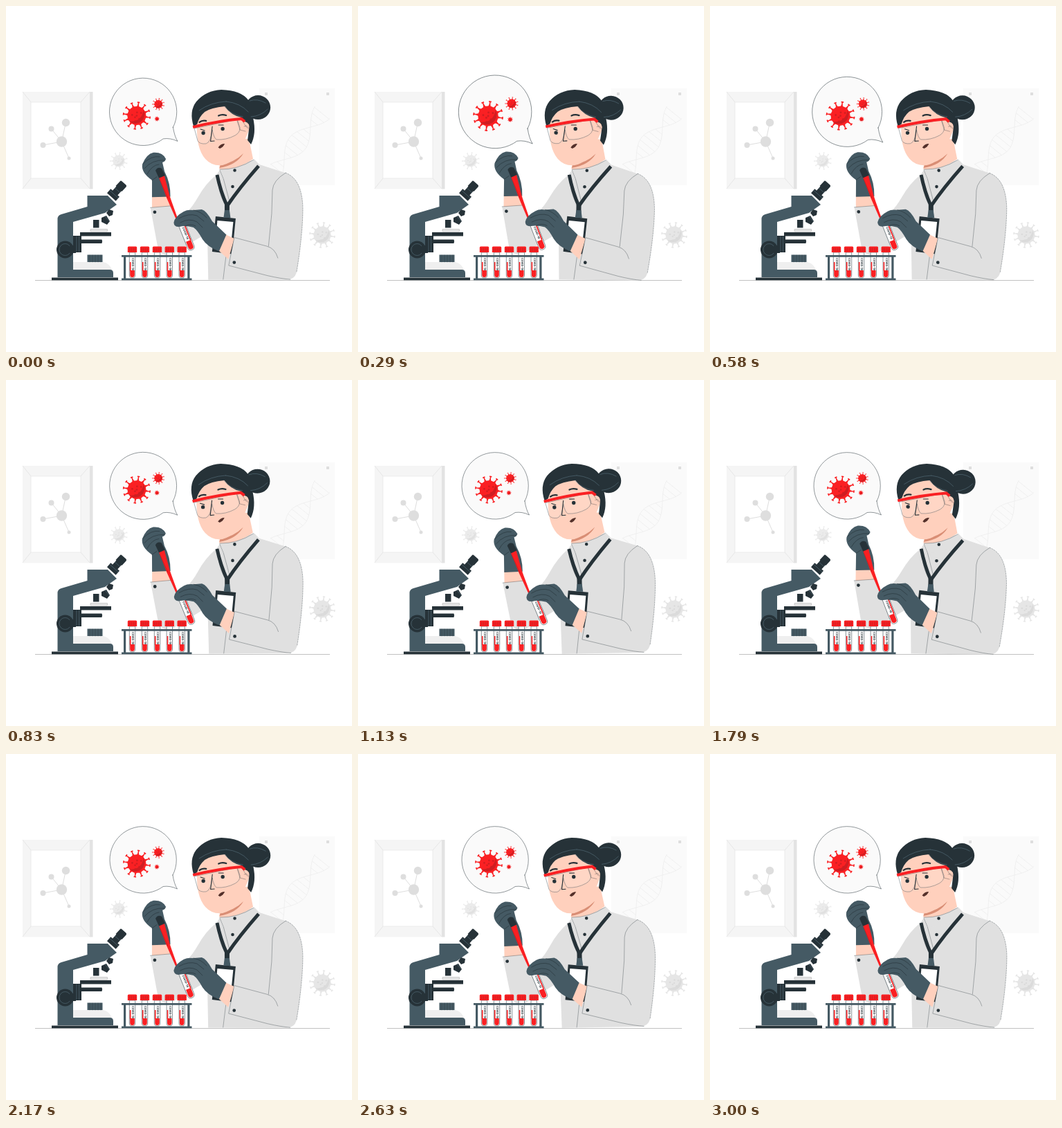
Recreate the animation shown at these times as an HTML page. Size 500 by 500 pixels, loop 3.04 s.

```html
<!DOCTYPE html>
<html lang="en">
<head>
<meta charset="utf-8">
<title>Laboratory scene</title>
<style>
html, body { margin: 0; width: 100%; height: 100%; overflow: hidden; background: #fff; }
svg { display: block; width: 100vw; height: 100vh; }
.dark { fill: #263238; }
.slate { fill: #455a64; }
.skin { fill: #ffd0bd; }
.coat { fill: #e0e0e0; }
.red { fill: #fa2023; }
.pen { fill: none; stroke: #263238; stroke-width: .6; stroke-linecap: round; stroke-linejoin: round; }
.thin { stroke-width: .35; }
.soft { fill: none; stroke: #607d8b; stroke-width: .5; stroke-linecap: round; }
text { font: bold 4px Inter, Roboto, sans-serif; fill: #263238; text-anchor: middle; }
</style>
</head>
<body>
<svg viewBox="0 0 500 500">
  <!-- wall -->
  <path fill="#f5f5f5" d="M24 124h97v140.500h-97z"/>
  <path fill="#e3e3e3" d="M121 124h4.500v140.500h-4.500z"/>
  <path fill="none" stroke="#e0e0e0" stroke-width=".7" d="M24 124l12 15M121 124l-13 15M24 264l12-15M121 264l-13-15"/>
  <path fill="#fff" stroke="#e6e6e6" stroke-width=".7" d="M36 139h72v110h-72z"/>
  <path stroke="#dedede" d="M80.500 196L86.500 168M80.500 196L65.500 177.500M80.500 196L53.500 201M80.500 196L91 220"/>
  <g fill="#dedede">
    <circle cx="86.500" cy="168.500" r="5.700"/><circle cx="65.500" cy="177.500" r="4"/>
    <circle cx="53.500" cy="201" r="4"/><circle cx="80.500" cy="196" r="7.700"/><circle cx="91" cy="220" r="2.500"/>
  </g>
  <path fill="#fafafa" d="M366 119h109v140h-109z"/>
  <path fill="#dedede" d="M374 125h4v4h-4zM463 125h4v4h-4z"/>
  <path id="helix" fill="none" stroke="#ebebeb" stroke-width=".7"/>
  <g id="paleViruses"></g>

  <path stroke="#a6a6a6" stroke-width=".7" d="M42 396.500H468"/>

  <!-- microscope -->
  <path class="slate" d="M74.500 392V308Q74.500 302.500 80 301L117.500 290V274H147L160 287L143 299L97 312V381H150Q155 381 155 386V392Z"/>
  <path fill="#efefef" d="M97 381V370H140Q149 371 153 381Z"/>
  <path class="slate" d="M117.500 359.500h22v10.500h-22z"/>
  <path class="pen thin" d="M121 360v10M125 360v10M129 360v10M133 360v10M137 360v10"/>
  <path class="dark" d="M66 392.500h96v3.800h-96zM107 327h45v5.500h-45zM97 332h12v24h-12zM109 337.500h29.500q1.500 3 0 5.500h-29.500zM126 309h8.500v11.500h-8.500z"/>
  <path class="dark" d="M138 306l7-3 5 8-4 5-8-4zM145 299l4-5 6 2-1 6-5 2z"/>
  <path class="soft" d="M102 333v22M105.500 333v22M143 304l6 7"/>
  <path fill="#e6e6e6" stroke="#b5b5b5" stroke-width=".6" d="M122 322.500h24.500v3.500h-24.500z"/>
  <g transform="translate(155 273) rotate(42)" class="dark">
    <path d="M-8.500-4h17v8h-17zM-5-14h10v12h-10zM-6-21q0-2 2-2h8q2 0 2 2v9h-12z"/>
    <path class="soft" d="M-8-1.500h16M-5-9h10"/>
  </g>
  <circle class="dark" cx="85.500" cy="352" r="12.500"/>
  <circle class="soft" cx="85.500" cy="352" r="8.500"/>
  <path class="dark" d="M92 346h9v11h-9z"/>

  <g id="bubble">
    <path class="pen" style="fill:#fafafa;stroke-width:.5" d="M241 175Q243 188 247.500 195Q237 190 227 191.500A48.200 48.200 0 1 1 241 175Z"/>
    <g id="redViruses"></g>
  </g>

  <g id="woman">
    <path class="skin" d="M211 273H237L241 292H211Z"/>
    <path class="coat" d="M309 237L304 244Q288 257 277 277Q269 291 262 297L246 306L238 289L208.700 291.500L218.500 344Q221 362 238 360L291 328L292.500 395.500H405Q417 395.500 420 385Q429 330 429 292Q428 250 404 241L366 229L359 222Z"/>
    <path class="pen thin" d="M208.700 291.500L238 289M246 306L251 317M309 237L314 249L324 286M318 362L314 395M404 241Q386 252 385 266L384 300L379.500 347M306 244Q306 267 315 284"/>
    <path class="pen thin" stroke-dasharray="2 1.500" d="M404 241Q428 250 429 292Q429 330 420 385"/>

    <!-- neck and face -->
    <path class="skin" d="M308 235L310 222L343 192H351L357 221Q334 237 309 236Z"/>
    <path fill="#d98e75" d="M308.500 234L310 229Q329 227 343 213Q333 230 308.500 234Z"/>
    <path class="skin" d="M276 169Q274 205 288 221Q298 232 313 230Q333 225 341 203L350 182Q357 168 345 166L325 143H290Z"/>
    <path class="coat" d="M309 236Q334 237 359 222L366 230Q344 250 315 250Z"/>
    <path class="pen thin" d="M309 236Q334 237 358 222"/>
    <path class="dark" d="M271 174Q264 152 275 138Q289 122 311 121Q340 122 350 136L357 162Q362 184 354 200L349 194L351 178Q353 169 345 167L340 161Q325 158 316 145Q296 147 287 153Q279 160 276 171Z"/>
    <ellipse class="dark" cx="364" cy="146.500" rx="18" ry="17.500"/>
    <path class="soft" d="M279 151Q296 139 318 138M315 145Q325 157 342 160M318 138Q338 140 350 153M354 160Q368 159 378 149M352 137Q363 133 375 140"/>
    <path class="pen thin" d="M344 174Q349 171 350 177"/>
    <path class="pen" style="stroke-width:2.300" d="M279.500 168Q283 165 289 166M307 158.500Q312 156 318 158"/>
    <path fill="#fff" fill-opacity=".12" stroke="#59656a" stroke-width=".5" d="M272 177L277 195Q280 200 289 199Q296 197 298 179Q300 190 304 193Q318 194 331 187Q338 183 338 176L334 164Z"/>
    <circle class="dark" cx="285" cy="183.500" r="2.700"/>
    <circle class="dark" cx="313" cy="177.500" r="2.700"/>
    <path class="pen" style="stroke-width:1.100" d="M281 178L287 180M307 172L314 172M298 174L295.500 195.500L301 195"/>
    <path fill="#54302a" d="M306.500 204.500Q310 199 316 199Q314 204 309 206Z"/>
    <path class="pen thin" d="M334 166L338 179L346 181M342 167L348 176"/>
    <path fill="none" stroke="#fa2023" stroke-width="4" d="M270 175Q307 166 340 163L345 167"/>

    <!-- lanyard and badge -->
    <path fill="none" stroke="#263238" stroke-width="5" d="M305 244Q310 268 319.500 289Q337 263 365 231"/>
    <path class="dark" d="M316 287h7v17h-7zM303 304L332 307L327 358.500L298 355Z"/>
    <path fill="#fff" d="M305.500 310L328.500 312L324.500 353L302 350.500Z"/>
    <path class="slate" d="M316 295h7l1.500 11h-10z"/>

    <!-- raised hand -->
    <path class="slate" d="M211 276.500L211 252Q195 241 197 229Q203 214 213 212Q226 211 231 221Q230 225 226 226L229 239Q238 256 237.500 275.500Z"/>
    <path class="pen" d="M198 228Q210 216 222 218M200 235Q211 222 229 223M204 243Q211 230 221 229M211 252L218 247"/>
    <path class="red" d="M220.500 247L228.500 244L237 276L248 306.500L245.500 307.500L232.500 278Z"/>
    <path class="dark" d="M216 238Q219 232 225 235L230 245L221 249Z"/>
    <path stroke="#b3191c" stroke-width=".6" d="M222 251L234 278"/>

    <!-- held tube -->
    <g transform="translate(251 308) rotate(-22)">
      <path fill="#fff" stroke="#59656a" stroke-width=".7" d="M-5 0H5V43Q5 48 0 48T-5 43Z"/>
      <path class="red" d="M-3.800 34H3.800V43Q3.800 46.800 0 46.800T-3.800 43ZM2.500 12h1.700v22h-1.700z"/>
      <text transform="translate(-1.200 22) rotate(90)">COVID-19</text>
    </g>
    <path class="skin" d="M317 330L330 336L321.500 366L307 353Z"/>
    <path class="slate" d="M242.500 313Q244 304 257 297Q262 294 271 295L283 294Q290 296 298 311L318.500 330.500L308 354.500Q291 348 284 337Q277 324 271 320Q259 317 251 319Q243 320 242.500 313Z"/>
    <path class="pen" d="M250 307Q264 299 276 303L286 311M252 313Q265 306 276 312L284 320M259 318Q267 314 274 318M271 295Q282 297 290 306"/>

    <!-- near sleeve -->
    <path class="coat" d="M330 334.500L380 348L401 384L411 395.500L322 375Z"/>
    <path class="pen thin" d="M393 364Q389 350 377 347L330 334.500L322 375L378 389.500Q398 394 411 395"/>
    <g class="dark">
      <circle cx="330" cy="370.500" r="2.400"/><circle cx="330.500" cy="237.500" r="2.300"/>
      <circle cx="327.500" cy="261" r="2.300"/><circle cx="215" cy="298" r="2.400"/>
    </g>
  </g>

  <g id="rack"></g>
</svg>
<script>
const el = id => document.getElementById(id);

function virus(x, y, r, spikes, fill, shade) {
  let out = `<g transform="translate(${x} ${y})" fill="${fill}">`;
  const w = r * .1;
  for (let i = 0; i < spikes; i++)
    out += `<path transform="rotate(${i * 360 / spikes + 8})" d="M${-w * 2} ${-r * .9}Q${-w * .5} ${-r} ${-w * .5} ${-r * 1.38}H${-w * 1.3}V${-r * 1.5}H${w * 1.3}V${-r * 1.38}H${w * .5}Q${w * .5} ${-r} ${w * 2} ${-r * .9}Z"/>`;
  out += `<circle r="${r}"/><path fill="${shade}" d="M${r * .75} ${-r * .6}A${r} ${r} 0 0 1 ${-r * .8} ${r * .6}Q${r * .5} ${r * .7} ${r * .75} ${-r * .6}"/>`;
  for (let i = 0; i < 7; i++) {
    const a = i * 2.4, d = r * .25 * Math.sqrt(i);
    out += `<circle cx="${d * Math.cos(a)}" cy="${d * Math.sin(a)}" r="${r * .1}" fill="${shade}"/>`;
  }
  return out + '</g>';
}

function tube(x) {
  return `<g transform="translate(${x} 0)">
    <path fill="#fff" stroke="#59656a" stroke-width=".7" d="M-4.200 356H4.200V389Q4.200 393 0 393T-4.200 389Z"/>
    <path class="red" d="M-3.300 382H3.300V388.500Q3.300 392 0 392T-3.300 388.500ZM-3.600 370h1.600v13h-1.600z"/>
    <path class="red" d="M-6.700 349q0-1.500 1.500-1.500h10.400q1.500 0 1.500 1.500v7h-13.400z"/>
    <path stroke="#a91c20" stroke-width=".6" d="M-4 349.500v5M-1.500 349.500v5M1.500 349.500v5M4 349.500v5"/>
    <text transform="translate(-.6 373) rotate(90)" style="font-size:3.800px">COVID-19</text></g>`;
}

function helixPath() {
  const point = (u, side) => {
    const s = side * 14 * Math.sin(Math.PI * u);
    return `${(402 + 38 * u + .78 * s).toFixed(1)} ${(222 - 47 * u + .63 * s).toFixed(1)}`;
  };
  let d = '';
  for (const side of [-1, 1])
    for (let i = -6; i <= 29; i++) d += (i === -6 ? 'M' : 'L') + point(i / 20, side);
  for (let i = -2; i <= 10; i++) d += `M${point(i / 7, -1)}L${point(i / 7, 1)}`;
  return d;
}

el('helix').setAttribute('d', helixPath());
el('paleViruses').innerHTML = virus(163, 224, 8.5, 11, '#ebebeb', '#e0e0e0') + virus(457, 331, 12.5, 12, '#e6e6e6', '#dbdbdb');
el('redViruses').innerHTML = virus(189, 158.5, 13.3, 12, '#fa2023', '#cf1e22')
  + virus(220, 142, 5.8, 11, '#fa2023', '#cf1e22') + virus(218, 163, 2.500, 9, '#fa2023', '#cf1e22');
el('rack').innerHTML = [182.5, 200.5, 218.5, 236.3, 254.2].map(tube).join('')
  + '<path class="slate" d="M167 360h101.500v2.800h-101.500zM167 393.500h101.500v2.800h-101.500zM170 362h3.200v32h-3.200zM262.300 362h3.200v32h-3.200z"/>';

// Linear interpolation through [time, value] pairs
function track(keys, t) {
  const i = Math.max(1, keys.findIndex(k => k[0] >= t));
  const [a, from] = keys[i - 1], [b, to] = keys[i];
  return from + (to - from) * (t - a) / (b - a);
}

const LOOP = 3040, LEAD = 30;
const beat = [[0, 1], [300, 1.1], [900, 1], [1200, 1], [1500, 1.1], [1800, 1], [3100, 1]];
const sway = [[0, 0], [375, 1], [1125, -1], [1500, 0]];

function draw(now) {
  const t = now % LOOP + LEAD;
  el('bubble').setAttribute('transform', `translate(198.500 153) scale(${track(beat, t)}) translate(-198.500 -153)`);
  el('woman').setAttribute('transform', `rotate(${track(sway, t % 1500)} 312 258)`);
  requestAnimationFrame(draw);
}
draw(0);
</script>
</body>
</html>
```
